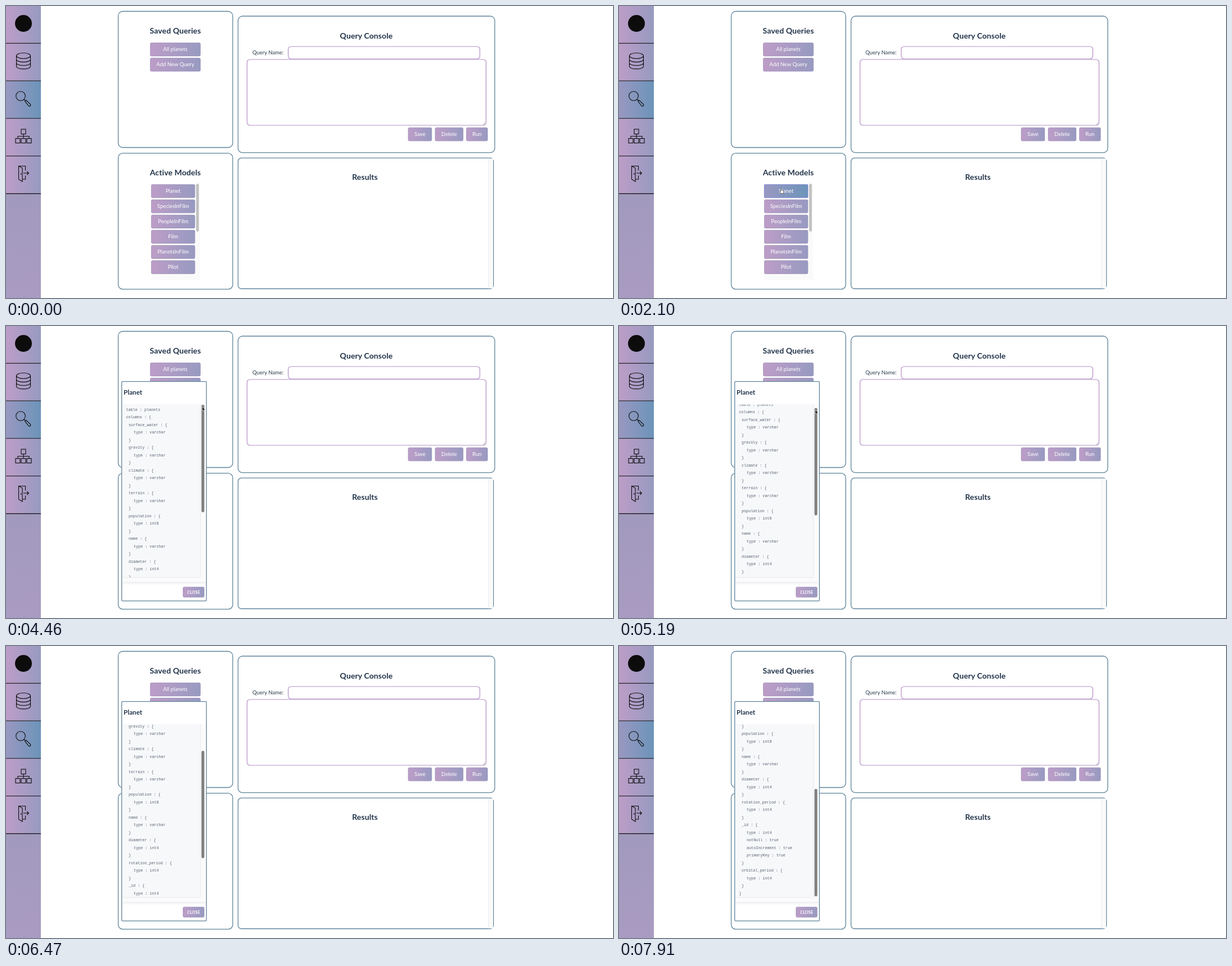
Write an HTML page that moves like this. It is 1079 px wide and 519 px high and loops after 7990 ms.

```html
<!DOCTYPE html>
<html lang="en">
<head>
<meta charset="utf-8">
<title>Query console</title>
<style>
  html, body { margin: 0; width: 100%; height: 100%; overflow: hidden; background: #fff; }
  svg { display: block; width: 1079px; height: 519px; font: 9.5px Lato, sans-serif; fill: #2c3e50; }
  .title { font-size: 14px; font-weight: bold; letter-spacing: .1px; fill: #22344a; }
  .label { fill: #fff; }
  .panel { fill: #fff; stroke: #5f849b; stroke-width: 1.3; }
  .field { fill: #fff; stroke: #b48fc5; stroke-width: 1.2; }
  .icon { fill: none; stroke: #0c0c0c; stroke-width: 1.1; }
  .code { font: 6.75px "Liberation Mono", monospace; fill: #566170; white-space: pre; }
  .middle { text-anchor: middle; }
</style>
</head>
<body>
<svg id="stage" viewBox="0 0 1079 519"></svg>
<script>
const LOOP = 7990;
const STEP = 80;
const LINE = 13.5;
const MODELS = ['Planet', 'SpeciesInFilm', 'PeopleInFilm', 'Film', 'PlanetsInFilm', 'Pilot'];
const COLUMNS = [
  ['surface_water', 'varchar'], ['gravity', 'varchar'], ['climate', 'varchar'],
  ['terrain', 'varchar'], ['population', 'int8'], ['name', 'varchar'],
  ['diameter', 'int4'], ['rotation_period', 'int4'],
  ['_id', 'int4', 'notNull : true', 'autoIncrement : true', 'primaryKey : true'],
  ['orbital_period', 'int4'],
];

// Markup helpers
const rect = (x, y, w, h, attrs = '') =>
  `<rect x="${x}" y="${y}" width="${w}" height="${h}" ${attrs}/>`;
const text = (x, y, content, cls = '') => `<text x="${x}" y="${y}" class="${cls}">${content}</text>`;
const heading = (x, y, content) => text(x, y, content, 'title middle');
const button = (x, y, w, h, label, id = '') =>
  rect(x, y, w, h, `rx="2" fill="url(#lilac)" stroke="#9489b4" stroke-width=".7" ${id && `id="${id}"`}`) +
  text(x + w / 2, y + h / 2 + 3.1, label, 'label middle');
const gradient = (id, from, to, attrs = '') =>
  `<linearGradient id="${id}" ${attrs}><stop stop-color="${from}"/><stop offset="1" stop-color="${to}"/></linearGradient>`;

const defs = `<defs>
  ${gradient('lilac', '#bd9dc7', '#979ac1')}
  ${gradient('blue', '#9998c1', '#6c94b9')}
  ${gradient('side', '#9499b8', '#a99bc1', 'x2="0" y2="1"')}
  <clipPath id="codeClip">${rect(207, 139.5, 139, 307.5)}</clipPath>
</defs>`;

function sidebar() {
  const tiles = [0, 1, 2, 3, 4].map(i => {
    const y = i * 66.8;
    return rect(0, y, 62, 66.8, `fill="url(#${i === 2 ? 'blue' : 'lilac'})"`) +
      rect(0, y + 65.7, 62, 1.3, 'fill="#111"');
  }).join('');
  const boxes = [17, 27, 37].map(x => rect(x, 235.5, 8, 8)).join('');
  return rect(0, 0, 62, 519, 'fill="url(#side)"') + tiles + `
    <circle cx="31" cy="31" r="15" fill="#0c0c0c"/>
    <g class="icon">
      <ellipse cx="31" cy="88.5" rx="12.5" ry="5"/>
      <path d="M18.500 88.500v18.500c0 6.500 25 6.500 25 0v-18.500M18.500 94.700c0 6.500 25 6.500 25 0M18.500 100.900c0 6.500 25 6.500 25 0"/>
      <circle cx="26" cy="160" r="8.300"/>
      <path d="M32 166l2.500 2.500M33.800 169.500l2-2 7.700 7.300q1 2-.5 3-1.500 1-2.500 0z"/>
      ${rect(27, 219, 8, 8.5)}${boxes}
      <path d="M31 227.500v8M21 235.500v-4h20v4"/>
      <path d="M22.500 284.500l6.500 3.500v24l-6.500-4zM22.500 284.500h12v8M34.500 301.500v6.500h-5.500M26.800 297v3M31 297h9M37.300 294l3 3-3 3"/>
    </g>`;
}

function page() {
  return `
    ${rect(199.5, 9.5, 203.5, 242, 'rx="8" class="panel"')}
    ${heading(301, 48.5, 'Saved Queries')}
    ${button(256.5, 65.5, 89, 23.5, 'All planets')}
    ${button(256.5, 92.5, 89, 23.5, 'Add New Query')}

    ${rect(412.5, 18, 456.3, 242.7, 'rx="8" class="panel"')}
    ${heading(640.5, 57.5, 'Query Console')}
    ${text(438, 85.7, 'Query Name:')}
    ${rect(501.7, 72, 340.6, 22, 'rx="5" class="field"')}
    ${rect(428.5, 95, 424.8, 117, 'rx="5" class="field"')}
    <path d="M848 211l4-4M850.500 211l1.500-1.500" stroke="#888" stroke-width=".7"/>
    ${button(715, 216.3, 41.7, 23.5, 'Save')}
    ${button(763, 216.3, 49.5, 23.5, 'Delete')}
    ${button(818.5, 216.3, 37.5, 23.5, 'Run')}

    ${rect(199.5, 261.7, 203.5, 241.6, 'rx="8" class="panel"')}
    ${heading(301, 300.5, 'Active Models')}
    ${rect(337, 315, 8, 172, 'fill="#fafafa"')}
    ${rect(258, 478.5, 87, 8, 'fill="#fafafa"')}
    ${rect(338, 316, 4.8, 85, 'rx="2.4" fill="#c1c1c1"')}
    ${MODELS.map((name, i) => button(258.4, 317.3 + i * 27.05, 77.4, 23.5, name, i ? '' : 'hovered')).join('')}

    ${rect(412.5, 270.2, 454, 232.3, 'rx="6" class="panel"')}
    ${rect(857.5, 271, 8.4, 231, 'fill="#fafafa"')}
    ${rect(857, 271, .7, 231, 'fill="#e8e8e8"')}
    ${heading(638, 308.5, 'Results')}`;
}

function codeLines() {
  const lines = [[0, 'table : planets'], [0, 'columns : {']];
  for (const [name, type, ...flags] of COLUMNS) {
    lines.push([4.5, `${name} : {`], [13.5, `type : ${type}`], ...flags.map(f => [13.5, f]), [4.5, '}']);
  }
  lines.push([0, '}']);
  return lines.map(([indent, line], i) => text(213.5 + indent, 150.6 + i * LINE, line)).join('');
}

const modal = `<g id="modal">
  ${rect(205.7, 98.7, 150.6, 390, 'rx="1.5" class="panel"')}
  <text x="209" y="121.500" class="title" style="font-size:11.500px">Planet</text>
  ${rect(207, 139, 147.5, 318, 'fill="#fbfbfb"')}
  ${rect(207, 139, 139, 308, 'fill="#f7f8fa"')}
  <path d="M345.800 139v308H207M207 455.500h147M207 458h149" fill="none" stroke="#e3e4e8" stroke-width=".8"/>
  <g clip-path="url(#codeClip)"><g id="code" class="code">${codeLines()}</g></g>
  <rect id="thumb" height="191" rx="2.300"/>
  ${rect(314.8, 464, 37.4, 18, 'rx="2" fill="url(#lilac)" stroke="#9489b4" stroke-width=".7"')}
  <text x="333.500" y="475.600" class="label middle" style="font-size:7.400px;font-weight:bold">CLOSE</text>
</g>`;

const cursors = `<g id="cursor" stroke-linejoin="round">
  <path id="arrow" d="M0 0v7.400l1.700-1.500 1.200 2.700 1.200-.5-1.200-2.700h2.300z" fill="#111" stroke="#fff" stroke-width=".6"/>
  <path id="hand" d="M-.6 0q1-.8 1.500.3l.5 2.200 2.800.6q1 .3.800 1.600l-.6 3.500h-4l-2.400-3.300q.2-1 1.300-.5l.8.500z" fill="#fff" stroke="#222" stroke-width=".6"/>
</g>`;

document.getElementById('stage').innerHTML = defs + page() + sidebar() + modal + cursors;
const [hovered, modalBox, code, thumb, cursor, arrow, hand] =
  ['hovered', 'modal', 'code', 'thumb', 'cursor', 'arrow', 'hand'].map(id => document.getElementById(id));

// Each point is [time, ...values]; values are interpolated linearly.
const CURSOR_PATH = [
  [10, 38, 165], [170, 230, 300], [250, 470, 362], [330, 758, 330], [410, 700, 140],
  [490, 540, 77], [650, 394, 150], [820, 394, 150],
  [1100, 375, 178], [1620, 297, 279], [1940, 287.5, 325], [3180, 287.5, 325],
  [3420, 288.5, 263.5], [3600, 276, 225], [3980, 329, 160], [4220, 349, 146], [4460, 349, 143.5],
];
const SCROLL_PATH = [[4900, 0], [5190, 9], [5830, 38], [6470, 73.5], [7110, 115.7], [7910, 181.5]];
const BURSTS = [0, 90, 900, 2100, 2600, 3260, 4950];

function sample(path, t) {
  const next = path.findIndex(point => point[0] > t);
  if (next === 0) return path[0].slice(1);
  if (next < 0) return path[path.length - 1].slice(1);
  const a = path[next - 1], b = path[next];
  const k = (t - a[0]) / (b[0] - a[0]);
  return a.slice(1).map((value, i) => value + (b[i + 1] - value) * k);
}

function snap(t) {
  const start = BURSTS.filter(burst => burst <= t).pop();
  return start + Math.floor((t - start) / STEP) * STEP;
}

const show = (node, visible) => node.setAttribute('visibility', visible ? 'visible' : 'hidden');
const set = (node, attrs) => Object.entries(attrs).forEach(([key, value]) => node.setAttribute(key, value));

function draw(now) {
  const t = now % LOOP;
  const time = snap(t);
  const [scroll] = sample(SCROLL_PATH, time);
  const shift = scroll / 1.592;
  const [x, y] = sample(CURSOR_PATH, time);
  const open = time >= 2600;
  const overModel = y >= 317 && time > 1620 && !open;
  const overThumb = time >= 4220;

  set(hovered, {
    fill: `url(#${overModel ? 'blue' : 'lilac'})`,
    stroke: time >= 2100 && !open ? '#7d82d6' : '#9489b4',
    'stroke-width': time >= 2100 && !open ? 1.1 : .7,
  });
  show(modalBox, open);
  set(modalBox, { opacity: time < 2680 ? .6 : 1 });
  set(code, { transform: `translate(0 ${-scroll})` });
  set(thumb, {
    x: overThumb ? 347.5 : 347.9,
    y: 140 + shift,
    width: overThumb ? 5 : 4.5,
    fill: overThumb ? '#7f7f7f' : '#c1c1c1',
  });
  const cursorVisible = time >= 90 && time < 5700;
  show(arrow, cursorVisible && !overModel);
  show(hand, cursorVisible && overModel);
  set(cursor, { transform: `translate(${x} ${y + shift})` });
}

function frame(now) {
  draw(now);
  requestAnimationFrame(frame);
}
draw(0);
requestAnimationFrame(frame);
</script>
</body>
</html>
```
